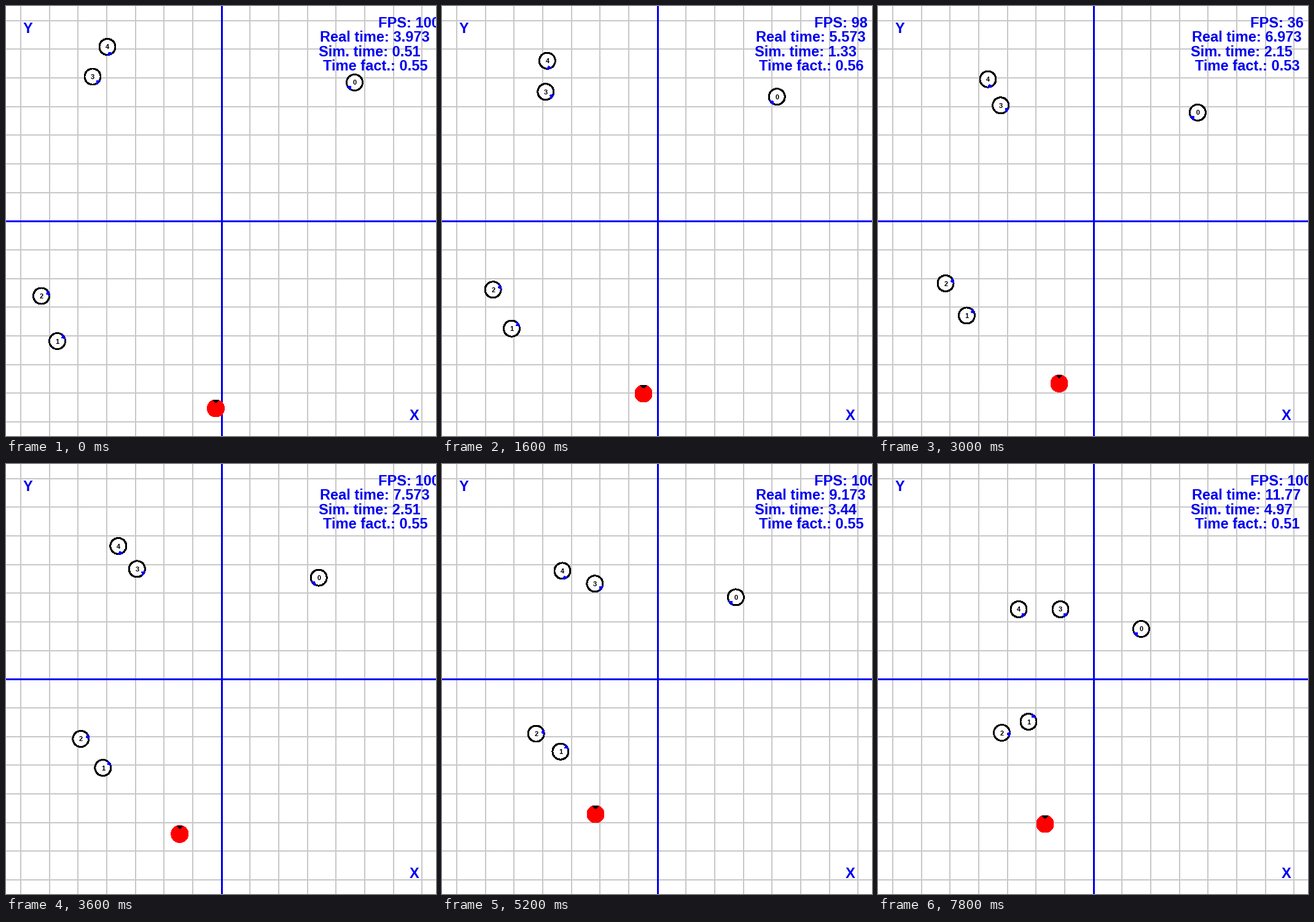
Write a matplotlib script that moves like this. It is 700 px wide and 700 px high and loops after 8000 ms.

```python
import random
import numpy as np
import matplotlib.pyplot as plt
from matplotlib.animation import FuncAnimation
from matplotlib.patches import Circle, Polygon

SIZE, STEP, FRAMES = 700, 200, 40
STALL = 3          # the simulation skips one update here
TICKS = FRAMES - 2
PT = 0.72          # points per pixel at 100 dpi
BLUE, GRID = "#0000f0", "#c8c8c8"
FONT = dict(family="Liberation Sans", weight="bold")

# Each robot follows one cubic Bezier curve
CURVES = np.array([
    [(567.5, 124.5), (530, 163.5), (475.5, 220), (428.5, 268.5)],
    [(83.5, 545.5), (136, 509), (199, 471), (245, 419.5)],
    [(57.5, 472), (102, 454.5), (157.5, 429), (201.5, 437.5)],
    [(141, 115), (187, 162.5), (260, 192), (297, 236.5)],
    [(165, 66.5), (176, 99), (188, 182.5), (229, 236.5)],
])

# Turning points of the steered red disc: tick, x, y
TURNS = np.array([(0, 341.5, 655), (2, 341.5, 644), (7, 328, 631), (11.5, 311.5, 614.5),
                  (14, 295, 614.5), (25, 250, 570), (31, 240, 584.5), (38, 272, 586)])


def bezier(points, u):
    """Position and direction on a cubic curve, by repeated interpolation."""
    while len(points) > 2:
        points = points[:-1] + u * np.diff(points, axis=0)
    direction = points[1] - points[0]
    return points[0] + u * direction, direction


def wedge(center, direction):
    """Triangle on the rim whose tip points at the centre."""
    angles = np.arctan2(direction[1], direction[0]) + np.array([-.33, .33, 0])
    reach = np.array([[14], [14], [9]])
    return center + reach * np.column_stack((np.cos(angles), np.sin(angles)))


fig = plt.figure(figsize=(SIZE / 100, SIZE / 100), dpi=100, facecolor="white")
ax = fig.add_axes([0, 0, 1, 1])
ax.set(xlim=(0, SIZE), ylim=(SIZE, 0))
ax.axis("off")


def label(x, y, text="", size=23.6, color=BLUE, **kw):
    return ax.text(x, y, text, fontsize=size * PT, color=color, **FONT, **kw)


def shape(patch, zorder):
    patch.set(antialiased=False, zorder=zorder)
    return ax.add_patch(patch)


def rule(span, start, width, color, zorder):
    span(start, start + width, color=color, lw=0, antialiased=False, zorder=zorder)


for k in range(-7, 8):
    offset = k * SIZE / 15
    rule(ax.axvspan, round(350.6 + offset) - 1, 2, GRID, 1)
    rule(ax.axhspan, round(350.4 + offset) - 1, 2, GRID, 1)
rule(ax.axvspan, 350, 3, BLUE, 2)
rule(ax.axhspan, 349, 3, BLUE, 2)
label(35.5, 43.5, "Y", ha="center")
label(664.5, 674, "X", ha="center")
hud = [label(x, 35 + 23.3 * row) for row, x in enumerate((606.3, 510.8, 508.8, 516.5))]

robots = []
for n in range(len(CURVES)):
    ring = shape(Circle((0, 0), 13, fc="white", ec="black", lw=1.9 * PT), 4)
    mark = shape(Polygon(np.zeros((3, 2)), fc="#0000ff", lw=0), 5)
    robots.append((ring, mark, label(0, 0, str(n), 11, "black", ha="center", zorder=6)))
disc = shape(Circle((0, 0), 14, fc="red", lw=0), 7)
nose = shape(Polygon(np.zeros((3, 2)), fc="black", lw=0), 8)


def draw(frame):
    tick = frame - (frame >= STALL)
    u = tick / TICKS

    for curve, (ring, mark, digit) in zip(CURVES, robots):
        pos, direction = bezier(curve, u)
        ring.center = pos
        mark.set_xy(wedge(pos, direction))
        digit.set_position(pos + (.3, 4))

    center = np.array([np.interp(tick, TURNS[:, 0], TURNS[:, k]) for k in (1, 2)])
    disc.center = center
    nose.set_xy(wedge(center, (0, -1)))

    rng = random.Random(tick)
    wall = 3.973 + STEP / 1000 * (frame - (frame == STALL))
    lines = (f"FPS: {rng.choice((36, 66, 98, 100))}",
             f"Real time: {wall:.3f}"[:16],
             f"Sim. time: {round(.51 + 4.46 * u, 2)}",
             f"Time fact.: {round(rng.uniform(.47, .57), 2)}")
    for item, text in zip(hud, lines):
        item.set_text(text)


animation = FuncAnimation(fig, draw, frames=FRAMES, interval=STEP,
                          repeat=True, repeat_delay=0, blit=False)
plt.show()
```
